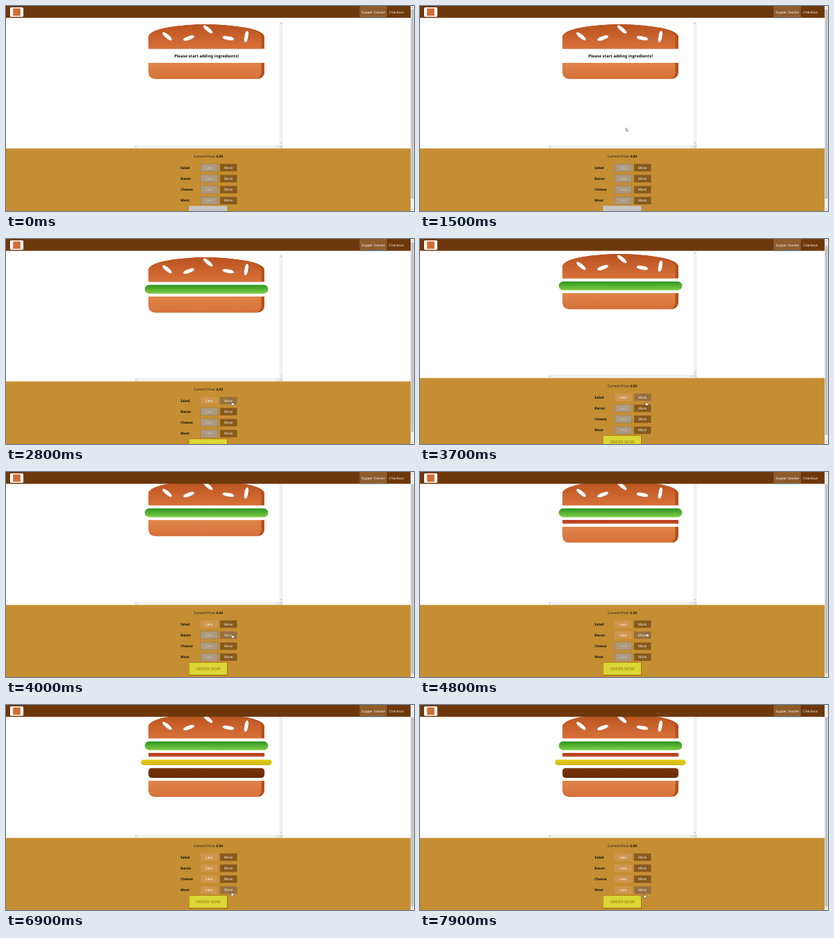
Write an HTML page that moves like this. It is 600 by 303 pixels and loops after 8 s.

```html
<!DOCTYPE html>
<html lang="en">
<head>
<meta charset="utf-8">
<title>Supper Stacker</title>
<style>
html, body { margin: 0; height: 100%; overflow: hidden; background: #fff; }
svg { display: block; width: 100vw; height: 100vh; }
text { font: 5px "Open Sans", sans-serif; text-rendering: geometricPrecision; fill: #111; }
.b { font-weight: 700; }
.big { font-size: 6px; }
.mid { text-anchor: middle; }
.w { fill: #fff; }
.track { fill: #f1f1f1; }
.arrow { fill: #8c8c8c; }
</style>
</head>
<body>
<svg viewBox="0 0 600 303" xmlns="http://www.w3.org/2000/svg">
  <defs>
    <path id="top" d="M209.5 63.6V45.3a85.3 18.3 0 0 1 170.6 0v18.3z"/>
    <path id="bottom" d="M209.5 0h170.6v14.4a9.4 9.4 0 0 1-9.4 9.4H218.9a9.4 9.4 0 0 1-9.4-9.4z"/>
    <clipPath id="topClip"><use href="#top"/></clipPath>
    <clipPath id="bottomClip"><use href="#bottom"/></clipPath>
  </defs>
  <rect width="600" height="303" fill="#fff"/>
  <g id="page">
    <g clip-path="url(#topClip)">
      <use href="#top" fill="#b5501b"/>
      <use href="#top" x="-4.7" fill="url(#gTop)"/>
    </g>
    <g id="seeds"></g>
    <text id="hint" class="b big mid" x="294.8" y="75.7">Please start adding ingredients!</text>
    <g id="layers"></g>
    <g id="base" clip-path="url(#bottomClip)">
      <use href="#bottom" fill="#b5501b"/>
      <use href="#bottom" x="-4.7" fill="url(#gBase)"/>
    </g>
    <path class="track" d="M402 23h5v182.5h-5zM188.5 205.5H402v5H188.5z"/>
    <path fill="#dcdcdc" d="M402 205.5h5v5h-5z"/>
    <path class="arrow" d="M403.5 26l1-1.3 1 1.3zM403.5 202l1 1.3 1-1.3zM191.6 207l-1.3 1 1.3 1zM398.6 207l1.3 1-1.3 1z"/>
    <rect y="210.5" width="595" height="110" fill="#c58e32"/>
    <text x="275.8" y="223.8">Current Price: <tspan id="price" class="b"></tspan></text>
    <g id="rows"></g>
    <rect x="269.6" y="296.3" width="56.4" height="18.6" fill="#966909"/>
    <rect id="order" x="269.2" y="295.8" width="56" height="18.2" stroke="#966909" stroke-width=".4"/>
    <text id="orderText" class="big mid" x="297.2" y="307.1">ORDER NOW</text>
  </g>
  <rect width="595" height="17.5" fill="#6d380b"/>
  <rect x="6" y="2" width="19.5" height="14" rx="1.6" fill="#fff"/>
  <rect x="10.3" y="3.5" width="11" height="11" fill="#cf6d36"/>
  <rect x="520" width="40" height="17" fill="#8f5c2c"/>
  <rect x="520" y="16.8" width="40" height="1.2" fill="#6d93a0"/>
  <text class="w mid" x="540.2" y="10.5">Supper Stacker</text>
  <text class="w mid" x="574.2" y="10.5">Checkout</text>
  <rect class="track" x="595" width="5" height="303"/>
  <rect id="thumb" x="595.6" width="3.8" height="280" fill="#c1c1c1"/>
  <path class="arrow" d="M596.5 3.2l1-1.3 1 1.3zM596.5 299.8l1 1.3 1-1.3z"/>
  <g id="cursor" fill="#fff" stroke="#222" stroke-width=".45" stroke-linejoin="round">
    <path id="arrow" d="M0 0v5l1.2-1 .8 1.8.8-.4-.8-1.7h1.5z"/>
    <path id="hand" d="M-.5.4q.5-.7 1 0v1.9l2 .5q.7.2.6 1l-.4 2.2H-.4L-1.8 3.7q.2-.7.8-.4l.5.5z"/>
  </g>
</svg>
<script>
const LOOP = 8000, BUN_GAP = 4.26, ROW_STEP = 16.25;
const $ = id => document.getElementById(id);
const set = (el, attrs) => { for (const k in attrs) el.setAttribute(k, attrs[k]); return el; };
const add = (parent, tag, attrs, text = "") => {
  const el = set(document.createElementNS("http://www.w3.org/2000/svg", tag), attrs);
  el.textContent = text;
  return parent.appendChild(el);
};
const show = (el, on) => el.setAttribute("visibility", on ? "visible" : "hidden");

function gradient(id, from, to) {
  const g = add(document.querySelector("defs"), "linearGradient", { id, x2: 0, y2: 1 });
  add(g, "stop", { "stop-color": from });
  add(g, "stop", { offset: 1, "stop-color": to });
}
gradient("gTop", "#b9521f", "#d87139");
gradient("gBase", "#e0854a", "#d5713a");

// Seeds: centre and tilt
for (const [x, y, a] of [[237, 45, 40], [269, 47.5, -20], [297, 34.8, 40], [327, 47.7, 10], [353.2, 45.3, 100]]) {
  const g = add($("seeds"), "g", { transform: `translate(${x} ${y}) rotate(${a})` });
  const seed = { x: -8.5, y: -2.75, width: 17, height: 5.5, rx: 6.8, ry: 2.2 };
  add(g, "rect", { ...seed, fill: "#cfc6c2" });
  add(g, "rect", { ...seed, width: 16.4, height: 4.8, fill: "#fff" });
}

const items = [
  { name: "Salad", at: 2800, cost: 0.5, w: 181.3, h: 12.8, r: 6.2, from: "#2a9620", to: "#80cc45" },
  { name: "Bacon", at: 4700, cost: 0.7, w: 170.6, h: 5.5, r: 0, from: "#b83416", to: "#c05232" },
  { name: "Cheese", at: 5700, cost: 0.4, w: 192, h: 8.2, r: 4.1, from: "#e6cb0c", to: "#d3b91c" },
  { name: "Meat", at: 6700, cost: 1.3, w: 170.6, h: 14.6, r: 4.7, from: "#7a3408", to: "#672a05" }
];

let y = 63.6 + BUN_GAP;
items.forEach((it, i) => {
  gradient("g" + it.name, it.from, it.to);
  it.layer = add($("layers"), "rect", {
    x: 294.8 - it.w / 2, y, width: it.w, height: it.h, rx: it.r, fill: `url(#g${it.name})`
  });
  y += it.h + BUN_GAP;
  it.end = y;

  it.top = 233.4 + ROW_STEP * i;
  const rows = $("rows"), box = { y: it.top, width: 25, height: 11 }, base = it.top + 7.3;
  add(rows, "text", { class: "b", x: 256.8, y: base }, it.name);
  it.less = add(rows, "rect", { ...box, x: 286.5, "stroke-width": 0.4 });
  it.lessText = add(rows, "text", { class: "mid", x: 299, y: base }, "Less");
  it.more = add(rows, "rect", { ...box, x: 314.8 });
  add(rows, "text", { class: "w mid", x: 327.2, y: base }, "More");
});

// Pointer tip: time, x, y
const path = [
  [800, 308, 153.5], [1200, 308, 153.5], [1300, 306, 162], [1400, 306, 162], [1500, 302.8, 180],
  [1700, 302.8, 181], [2100, 316, 214], [2500, 332.5, 240], [3900, 332.5, 240], [4400, 333.5, 237.5],
  [4900, 333.5, 237.5], [5500, 332.8, 260.5], [6000, 332.8, 260.5], [6500, 332, 276],
  [7200, 332, 276], [7800, 329.8, 279], [LOOP, 329.8, 279]
];
function pointer(t) {
  const i = Math.max(1, path.findIndex(p => p[0] > t));
  const [t0, x0, y0] = path[i - 1], [t1, x1, y1] = path[i];
  const k = Math.max(0, (t - t0) / (t1 - t0));
  return [x0 + (x1 - x0) * k, y0 + (y1 - y0) * k];
}

function draw(t) {
  const scroll = t < 3700 ? 0 : t < 3800 ? 5 : 14;
  const [px, py] = pointer(t);
  let price = 4, baseY = 84, hovering = false;

  for (const it of items) {
    const on = t >= it.at, dy = py + scroll - it.top;
    const hover = t >= 800 && px > 314.8 && px < 339.8 && dy > -1 && dy < 12;
    if (on) { price += it.cost; baseY = it.end; }
    hovering ||= hover;
    show(it.layer, on);
    set(it.less, { fill: on ? "#d09650" : "#ac9980", stroke: on ? "none" : "#7e7365" });
    it.lessText.style.fill = on ? "#fff" : "#ccc";
    set(it.more, { fill: hover ? "#99703f" : "#885a1e" });
  }

  const ready = t >= items[0].at;
  show($("hint"), !ready);
  set($("base"), { transform: `translate(0 ${baseY})` });
  $("price").textContent = price.toFixed(2);
  set($("order"), { fill: ready ? "#dad735" : "#c7c6c6", stroke: ready ? "#966909" : "#ccc" });
  $("orderText").style.fill = ready ? "#966909" : "#888";
  set($("page"), { transform: `translate(0 ${-scroll})` });
  set($("thumb"), { y: 5 + scroll * 0.93 });

  set($("cursor"), { transform: `translate(${px} ${py})` });
  show($("arrow"), t >= 800 && !hovering);
  show($("hand"), hovering);
}

function tick() {
  draw(Math.floor(performance.now() % LOOP / 100) * 100);
  requestAnimationFrame(tick);
}
tick();
</script>
</body>
</html>
```
